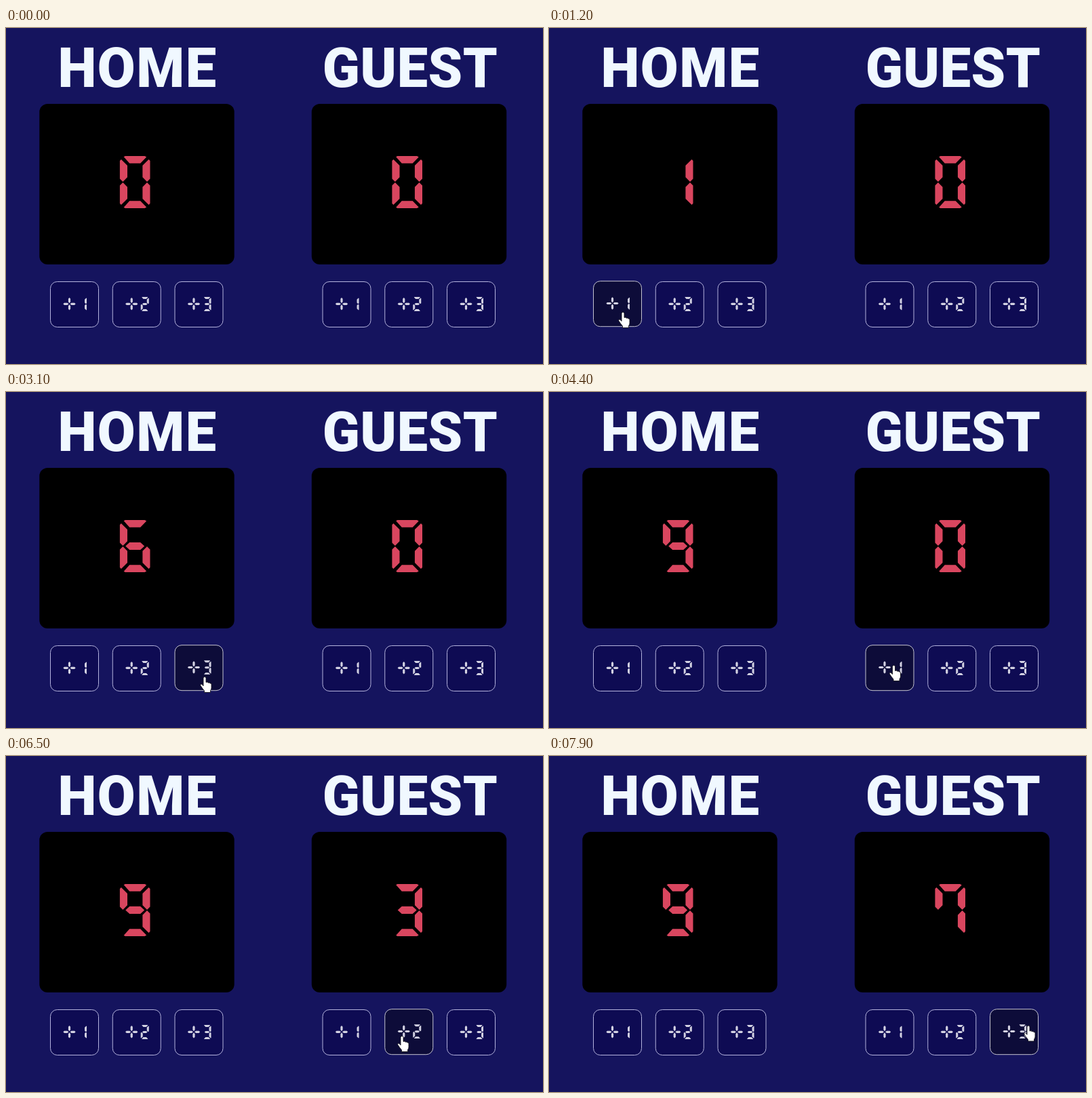
An HTML page for the animation above (8000 ms loop, 792 by 496 pixels).

```html
<!DOCTYPE html>
<html lang="en">
<head>
<meta charset="utf-8">
<title>Scoreboard</title>
<style>
  html, body { margin: 0; width: 100%; height: 100%; overflow: hidden; background: #15145e; }
  svg { display: block; }
  text { font: 900 81px Roboto, "Liberation Sans", sans-serif; fill: #f0f8ff; text-anchor: middle; }
  .score { fill: #d9465f; }
  .button rect { fill: #0e0b53; stroke: #b4b3dd; stroke-width: 1; }
  .button path { fill: #d3d2e2; }
  .button.hover { transform: translateY(-.8px); }
  .button.hover rect { fill: #0d0c39; stroke: #c4c3d0; }
  #cursor path { fill: #fff; stroke: #16161c; stroke-width: .9; stroke-linejoin: round; }
</style>
</head>
<body>
<svg id="stage" width="792" height="496" viewBox="0 0 792 496">
  <text x="194" y="86.5" letter-spacing="1.5">HOME</text>
  <text x="596" y="86.5" letter-spacing=".5">GUEST</text>
</svg>
<script>
const LOOP = 8000, STEP = 100, GUEST_DX = 401.5;
const stage = document.getElementById('stage');

function add(parent, tag, attrs) {
  const el = document.createElementNS('http://www.w3.org/2000/svg', tag);
  for (const key in attrs) el.setAttribute(key, attrs[key]);
  return parent.appendChild(el);
}

// Segment outlines around the digit's centre; the others are mirror images.
const TOP = [[-16.5, -37.2], [-14.5, -38.5], [14.5, -38.5], [17, -37], [8, -27.8], [-8, -27.8]];
const SIDE = [[20.3, -33.5], [22.3, -31.5], [22.3, -5], [17.8, -.5], [11.2, -7.2], [11.2, -24.6]];
const MIDDLE = [[-14, 0], [-8, -5.5], [8, -5.5], [14, 0], [8, 5.5], [-8, 5.5]];
const flip = (points, sx, sy) => points.map(([x, y]) => [x * sx, y * sy]);
const outline = points => 'M' + points.map(p => p.join(' ')).join('L') + 'Z';

const SEGMENTS = {
  a: TOP, b: SIDE, c: flip(SIDE, 1, -1), d: flip(TOP, 1, -1),
  e: flip(SIDE, -1, -1), f: flip(SIDE, -1, 1), g: MIDDLE
};
const DIGITS = ['abcdef', 'bc', 'abdeg', 'abcdg', 'bcfg', 'acdfg', 'acdefg', 'abcf', 'abcdefg', 'abcdfg'];
const digitPath = n => [...DIGITS[n]].map(s => outline(SEGMENTS[s])).join('');

const ARM = [[1, 0], [3, -1.6], [7.5, -1.6], [9.2, 0], [7.5, 1.6], [3, 1.6]];
const plusPath = [
  ARM, flip(ARM, -1, 1),
  ARM.map(([x, y]) => [y, x]), ARM.map(([x, y]) => [y, -x])
].map(outline).join('');

const buttons = [];

function addTeam(dx) {
  add(stage, 'rect', { x: 49.3 + dx, y: 112, width: 287.4, height: 237, rx: 12 });
  for (let i = 0; i < 3; i++) {
    const x = 65.5 + dx + i * 91.75;
    const el = add(stage, 'g', { class: 'button', 'aria-label': '+' + (i + 1) });
    add(el, 'rect', { x, y: 374.5, width: 71, height: 67, rx: 10 });
    add(el, 'path', { d: plusPath, transform: `translate(${x + 28} 407.3)` });
    add(el, 'path', { d: digitPath(i + 1), transform: `translate(${x + 47.5} 407.5) scale(.27)` });
    buttons.push({ el, x });
  }
  return add(stage, 'path', { class: 'score', transform: `translate(${190.2 + dx} 227.5)` });
}

const home = addTeam(0), guest = addTeam(GUEST_DX);

const cursor = add(stage, 'g', { id: 'cursor' });
const hand = add(cursor, 'path', {
  d: 'M-2 2a2 2 0 0 1 4 0v6q2.5-1.2 3 .8 2.2-1 2.8 .8 2.2-.8 2.2 1.6v5q0 2-1.5 4v2.8h-9v-2.5q-3-3.5-5.5-7.5c-1-2 1-3 2.3-1.7l1.7 2z'
});
const arrow = add(cursor, 'path', { d: 'M0 0v16l3.8-3.6 2.6 6 2.6-1.1-2.6-5.9h5.3z' });

// [time, score]
const HOME_SCORES = [[0, 0], [1000, 1], [2100, 3], [3000, 6], [3400, 9]];
const GUEST_SCORES = [[0, 0], [5000, 1], [6200, 3], [6700, 5], [7100, 7]];

// [time, x, y]
const PATH = [
  [400, 101, 425], [800, 109, 419.5], [1200, 109, 419.5], [1600, 211, 418.5],
  [2700, 211, 418.5], [3000, 293, 420.5], [3500, 293, 420.5], [4200, 506, 407],
  [4600, 511, 400], [5400, 511, 400], [5900, 584, 413.5], [7200, 584, 413.5],
  [7500, 640, 440], [7900, 707, 398]
];

const scoreAt = (steps, t) => steps.filter(s => s[0] <= t).pop()[1];

function cursorAt(t) {
  const i = PATH.findIndex(p => p[0] > t);
  if (i === 0) return null;
  if (i < 0) return PATH[PATH.length - 1].slice(1);
  const [t0, x0, y0] = PATH[i - 1], [t1, x1, y1] = PATH[i];
  const u = (t - t0) / (t1 - t0), k = u * u * (3 - 2 * u);
  return [x0 + (x1 - x0) * k, y0 + (y1 - y0) * k];
}

function render(t) {
  home.setAttribute('d', digitPath(scoreAt(HOME_SCORES, t)));
  guest.setAttribute('d', digitPath(scoreAt(GUEST_SCORES, t)));
  const pos = cursorAt(t);
  let over = false;
  for (const { el, x } of buttons) {
    const hit = !!pos && pos[0] >= x && pos[0] <= x + 71 && pos[1] >= 374 && pos[1] <= 441;
    el.classList.toggle('hover', hit);
    over = over || hit;
  }
  cursor.style.display = pos ? '' : 'none';
  if (pos) cursor.setAttribute('transform', `translate(${pos[0]} ${pos[1]})`);
  hand.style.display = over ? '' : 'none';
  arrow.style.display = over ? 'none' : '';
}

const start = performance.now();
function tick() {
  const t = (performance.now() - start) % LOOP;
  render(Math.floor(t / STEP) * STEP);
  requestAnimationFrame(tick);
}
tick();
</script>
</body>
</html>
```
